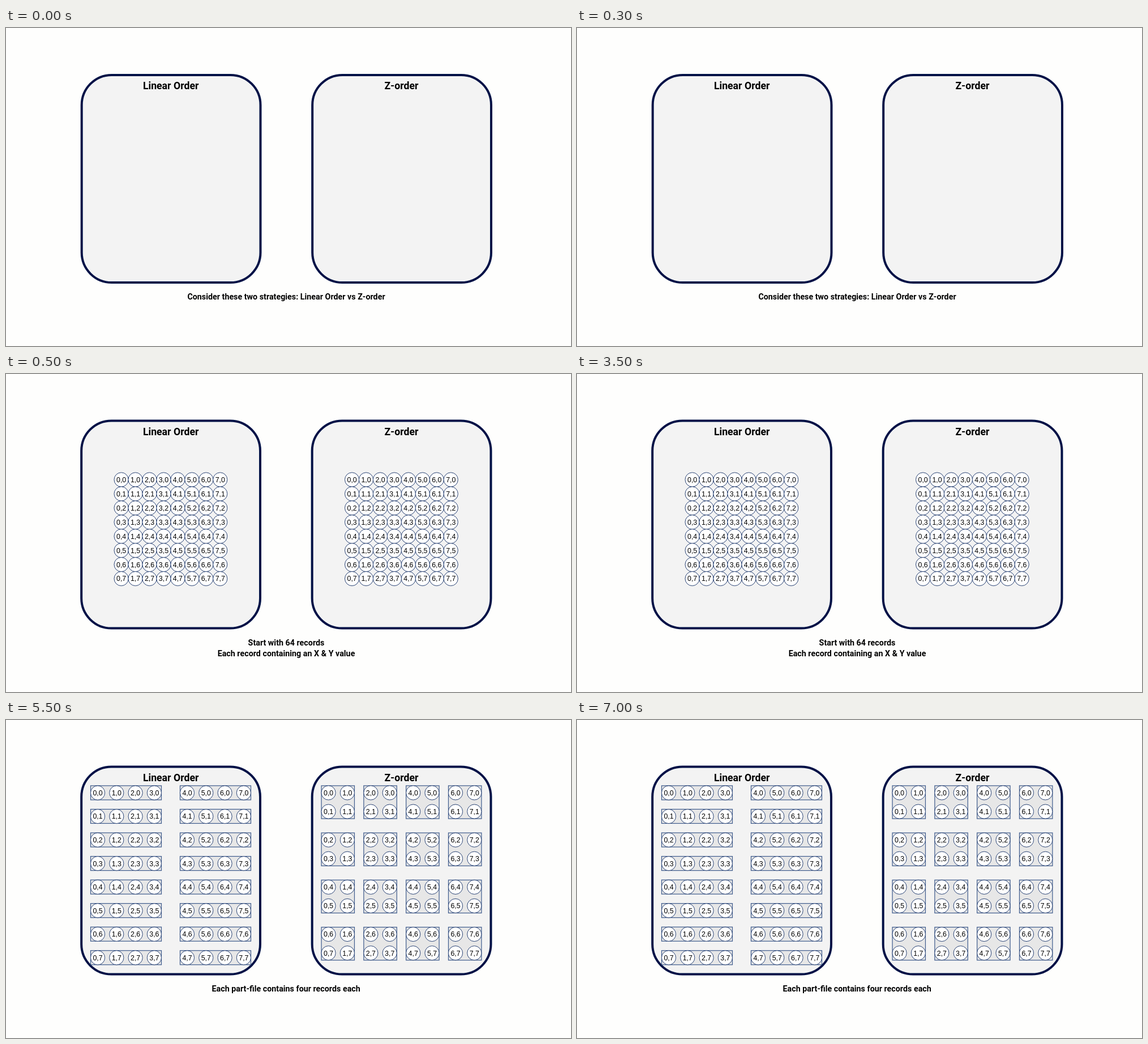
Animation of 998x561 px, one loop 8 s. Source, as an HTML page:

```html
<!DOCTYPE html>
<html lang="en">
<head>
<meta charset="utf-8">
<title>Linear Order vs Z-order</title>
<style>
  html, body { margin: 0; width: 100%; height: 100%; overflow: hidden; background: #fefefd; }
  svg { display: block; width: 100%; height: 100%; }
  text { text-anchor: middle; fill: #000; }
  .title { font: 700 17.7px Roboto, sans-serif; }
  .caption { font: 700 14.3px Roboto, sans-serif; }
  .record text { font: 12.4px "Liberation Sans", Arial, sans-serif; }
  .record circle { fill: #fff; stroke: #2a4374; stroke-width: 1; }
  .file { fill: #e7e7e7; stroke: #3d5a8c; stroke-width: 1.2; }
  .panel { fill: #f3f3f3; stroke: #001146; stroke-width: 4; }
</style>
</head>
<body>
<svg id="stage" viewBox="0 0 998 561"></svg>
<script>
const LOOP = 8000;
const GRID_AT = 500;
const FILES_AT = 5500;
const PANEL_GAP = 407.5;
const stage = document.getElementById('stage');

function add(parent, tag, attrs = {}, text) {
  const el = document.createElementNS('http://www.w3.org/2000/svg', tag);
  for (const key in attrs) el.setAttribute(key, attrs[key]);
  if (text !== undefined) el.textContent = text;
  parent.appendChild(el);
  return el;
}

function label(parent, cls, x, y, text) {
  return add(parent, 'text', { class: cls, x, y }, text);
}

function addRecords(parent, place) {
  for (let y = 0; y < 8; y++) {
    for (let x = 0; x < 8; x++) {
      const [cx, cy] = place(x, y);
      const g = add(parent, 'g', { class: 'record', transform: `translate(${cx} ${cy})` });
      add(g, 'circle', { r: 12.6 });
      add(g, 'text', { y: 4.4 }, `${x},${y}`);
    }
  }
}

function addFiles(parent, cols, rows, dx, dy, x0, w, h) {
  for (let r = 0; r < rows; r++) {
    for (let c = 0; c < cols; c++) {
      add(parent, 'rect', { class: 'file', x: x0 + c * dx, y: 115.9 + r * dy, width: w, height: h });
    }
  }
}

const panels = add(stage, 'g');
for (const x of [133.2, 133.2 + PANEL_GAP]) {
  add(panels, 'rect', { class: 'panel', x, y: 82.4, width: 315.8, height: 366.2, rx: 53 });
}
label(stage, 'title', 291.2, 108, 'Linear Order');
label(stage, 'title', 698.5, 108, 'Z-order');

const intro = add(stage, 'g');
label(intro, 'caption', 495, 479, 'Consider these two strategies: Linear Order vs Z-order');

const grid = add(stage, 'g');
for (const left of [203.6, 203.6 + PANEL_GAP]) {
  addRecords(grid, (x, y) => [left + x * 24.95, 186.4 + y * 24.95]);
}
label(grid, 'caption', 495, 479, 'Start with 64 records');
label(grid, 'caption', 495, 497.5, 'Each record containing an X & Y value');

const files = add(stage, 'g');
addFiles(files, 2, 8, 158, 41.55, 149.5, 125, 25);
addRecords(files, (x, y) => [162 + (x >> 2) * 158 + (x & 3) * 33.3, 128.5 + y * 41.55]);
addFiles(files, 4, 4, 74.8, 83.2, 557.1, 58.4, 58.2);
addRecords(files, (x, y) => [
  569.6 + (x >> 1) * 74.8 + (x & 1) * 33.3,
  128.4 + (y >> 1) * 83.2 + (y & 1) * 33.1
]);
label(files, 'caption', 494.7, 478.5, 'Each part-file contains four records each');

function show(el, on) {
  el.setAttribute('visibility', on ? 'visible' : 'hidden');
}

function render(t) {
  const early = t < GRID_AT;
  panels.setAttribute('transform', early ? 'translate(0.5 0.5)' : '');
  show(intro, early);
  show(grid, !early && t < FILES_AT);
  show(files, t >= FILES_AT);
}

const start = performance.now();
function tick() {
  render((performance.now() - start) % LOOP);
  requestAnimationFrame(tick);
}
tick();
</script>
</body>
</html>
```
